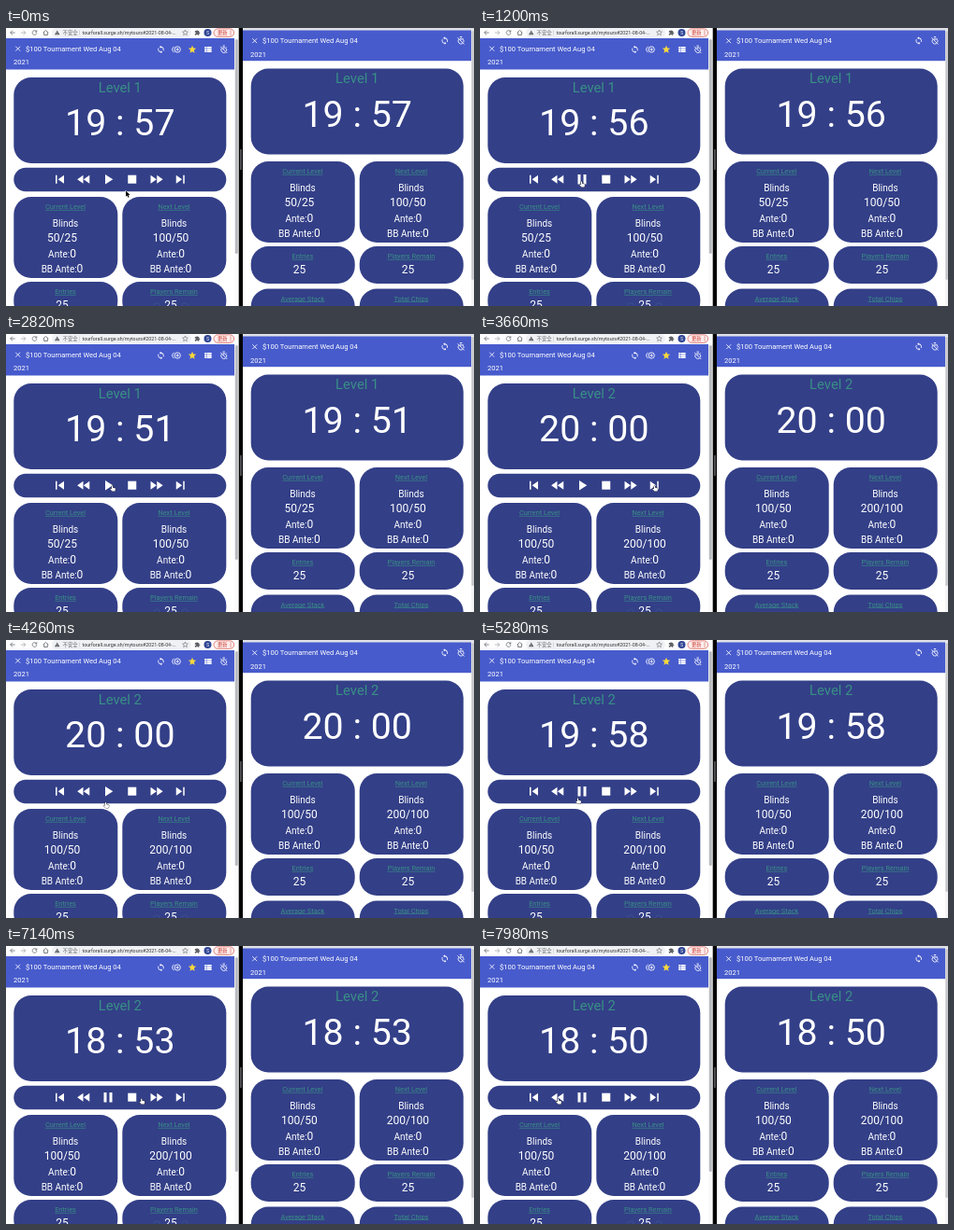
Animation, 500 px wide and 298 px high, one loop 8000 ms. Source, as an HTML page with a canvas:

```html
<!DOCTYPE html>
<html lang="zh-CN">
<head>
<meta charset="utf-8">
<title>Tournament clock</title>
<style>
html, body { margin: 0; width: 100%; height: 100%; overflow: hidden; background: #fff; }
canvas { display: block; width: 500px; height: 298px; }
</style>
</head>
<body>
<canvas id="stage"></canvas>
<script>
const W = 500, H = 298, LOOP = 8000, TICK = 330;
const BAR = '#475bcc', CARD = '#333f87', TEAL = '#398f86', WHITE = '#fff';
const RADIUS = 18.5, COLUMN = 116;
const SANS = 'Roboto, sans-serif', CJK = '"Noto Sans CJK SC", "Noto Sans CJK", sans-serif';

const canvas = document.getElementById('stage');
const ctx = canvas.getContext('2d');
const ratio = Math.max(1, window.devicePixelRatio || 1);
canvas.width = W * ratio;
canvas.height = H * ratio;

// Icons on a 24-unit grid
const ICONS = {
  prev: 'M6 6h2v12H6zm3.5 6l8.5 6V6z',
  rewind: 'M11 18V6l-8.5 6 8.5 6zm.5-6l8.5 6V6l-8.5 6z',
  play: 'M8 5v14l11-7z',
  pause: 'M6 19h4V5H6v14zm8-14v14h4V5h-4z',
  stop: 'M6 6h12v12H6z',
  forward: 'M4 18l8.5-6L4 6v12zm9-12v12l8.5-6L13 6z',
  next: 'M6 18l8.5-6L6 6v12zM16 6v12h2V6h-2z',
  star: 'M12 17.3L18.2 21l-1.6-7L22 9.2l-7.2-.6L12 2 9.2 8.6 2 9.2 7.5 14 5.8 21z',
  sync: 'M12 4V1L8 5l4 4V6c3.3 0 6 2.7 6 6 0 1-.25 2-.7 2.8l1.46 1.46C19.5 15 20 13.6 20 12c0-4.4-3.6-8-8-8zm0 14c-3.3 0-6-2.7-6-6 0-1 .25-2 .7-2.8L5.24 7.74C4.5 9 4 10.4 4 12c0 4.4 3.6 8 8 8v3l4-4-4-4v3z',
  list: 'M4 5h4v4H4zm0 5h4v4H4zm0 5h4v4H4zM9 5h12v4H9zm0 5h12v4H9zm0 5h12v4H9z',
  warn: 'M1 21h22L12 2zm12-3h-2v-2h2zm0-4h-2v-4h2z',
  puzzle: 'M20 11h-1V7c0-1-1-2-2-2h-4V4a2.5 2.5 0 0 0-5 0v1H4c-1 0-2 1-2 2v4h1.5a2.5 2.5 0 0 1 0 5H2v4c0 1 1 2 2 2h4v-1.5a2.5 2.5 0 0 1 5 0V22h4c1 0 2-1 2-2v-4h1a2.5 2.5 0 0 0 0-5z'
};
const LINES = {
  close: 'M5.5 5.5l13 13m0-13l-13 13',
  timer: 'M9 2h6M3 4l18 18M9 6.6a8 8 0 0 1 10.2 10.2M16.5 20A8 8 0 0 1 5.7 9M12 8v3M18 7l1.5-1.5',
  duplicate: 'M15 4a8 8 0 0 1 0 16a8 8 0 0 1 0-16M6 4.6a8 8 0 0 0 0 14.800M15 8v8m-4-4h8',
  back: 'M21 12H4m8-8l-8 8 8 8',
  ahead: 'M3 12h17m-8-8l8 8-8 8',
  reload: 'M19 8a8 8 0 1 0 1 5M20 3v6h-6',
  home: 'M3 12l9-8 9 8M6 10v10h12V10',
  star: ICONS.star
};
const toPaths = set => Object.fromEntries(Object.entries(set).map(([k, d]) => [k, new Path2D(d)]));
const fills = toPaths(ICONS), strokes = toPaths(LINES);
const handShape = new Path2D('M2 1.2Q2 0 2.7 0T3.4 1.2V2.6L6 3.100Q7 3.400 6.800 4.500L6.200 7H2.700L.3 4.600Q0 3.700 1 3.800L2 4.400Z');
const arrowShape = new Path2D('M0 0V6.3L1.5 5 2.5 7.2 3.6 6.7 2.6 4.6H4.5Z');

function onGrid(x, y, size, draw) {
  ctx.save();
  ctx.translate(x - size / 2, y - size / 2);
  ctx.scale(size / 24, size / 24);
  draw();
  ctx.restore();
}
function icon(name, x, y, size, color = WHITE) {
  onGrid(x, y, size, () => { ctx.fillStyle = color; ctx.fill(fills[name], 'evenodd'); });
}
function lineIcon(name, x, y, size, color = WHITE, width = 2.2) {
  onGrid(x, y, size, () => {
    ctx.strokeStyle = color;
    ctx.lineWidth = width;
    ctx.stroke(strokes[name]);
  });
}
function rect(x, y, w, h, color) {
  ctx.fillStyle = color;
  ctx.fillRect(x, y, w, h);
}
function round(x, y, w, h, r, color = CARD) {
  ctx.fillStyle = color;
  ctx.beginPath();
  ctx.roundRect(x, y, w, h, r);
  ctx.fill();
}
function circle(x, y, r, color) {
  ctx.fillStyle = color;
  ctx.beginPath();
  ctx.arc(x, y, r, 0, 7);
  ctx.fill();
}
function text(str, x, y, size, { color = WHITE, align = 'center', font = SANS } = {}) {
  ctx.font = `${size}px ${font}`;
  ctx.textAlign = align;
  ctx.fillStyle = color;
  ctx.fillText(str, x, y);
}
function heading(str, x, y) {
  text(str, x, y, 7.4, { color: TEAL });
  const w = ctx.measureText(str).width;
  rect(x - w / 2, y + 0.9, w, 0.6, TEAL);
}
function labelled(label, value, x, y) {
  ctx.font = `10px ${SANS}`;
  const a = ctx.measureText(label).width;
  ctx.font = `12px ${SANS}`;
  const left = x - (a + ctx.measureText(value).width) / 2;
  text(label, left, y, 10, { align: 'left' });
  text(value, left + a, y, 12, { align: 'left' });
}

function blindsCard(x, y, title, blinds) {
  round(x, y, 111, 87, RADIUS);
  const mid = x + 55.2;
  heading(title, mid, y + 13);
  text('Blinds', mid, y + 31.7, 10);
  text(blinds, mid - 3.5, y + 48, 12);
  labelled('Ante:', '0', mid - 3.5, y + 64.5);
  labelled('BB Ante:', '0', mid - 3.5, y + 81);
}
function countCard(x, y, title, value) {
  round(x, y, 111, 40, RADIUS);
  heading(title, x + 55.2, y + 13);
  text(value, x + 51.7, y + 29.3, 12);
}
function clockCard(x, y, game) {
  round(x, y, 227, 92, RADIUS);
  text('Level ' + game.level, x + 113.5, y + 15.6, 14.8, { color: TEAL });
  const two = n => String(n).padStart(2, '0');
  text(`${two(Math.floor(game.left / 60))} : ${two(game.left % 60)}`, x + 113.5, y + 62.3, 39.3);
}
function tables(x, y, game) {
  const [now, then] = game.level === 1 ? ['50/25', '100/50'] : ['100/50', '200/100'];
  blindsCard(x, y, 'Current Level', now);
  blindsCard(x + COLUMN, y, 'Next Level', then);
  countCard(x, y + 91, 'Entries', '25');
  countCard(x + COLUMN, y + 91, 'Players Remain', '25');
}
function appBar(x, y, w, h) {
  rect(x, y, w, h, BAR);
  lineIcon('close', x + 12.7, y + 11.2, 9);
  text('$100 Tournament Wed Aug 04', x + 21, y + 13.6, 7.55, { align: 'left' });
  text('2021', x + 8, y + 28.2, 7.55, { align: 'left' });
}

function browserBar() {
  const ink = '#5f6368';
  rect(0, 0, 248, 11, '#fdfdfe');
  round(49, 0, 149, 10, 5, '#f0f1f4');
  lineIcon('back', 7, 5, 7, ink, 2.6);
  lineIcon('ahead', 18.5, 5, 7, '#a5a8ac', 2.6);
  lineIcon('reload', 30.5, 5, 7, ink, 2.6);
  lineIcon('home', 42.5, 5, 7.5, ink, 2.6);
  icon('warn', 54.7, 5, 6, ink);
  text('不安全', 60.5, 7, 5.4, { color: ink, align: 'left', font: CJK });
  rect(78.5, 2.5, 0.5, 5, '#bbb');
  text('tourforall.surge.sh/mytours#2021-08-04-...', 81.5, 7, 5.3, { color: '#333', align: 'left' });
  lineIcon('star', 191.5, 5, 7, ink, 2);
  icon('puzzle', 204.5, 5, 6.5, ink);
  circle(215.5, 5, 4, '#2f4595');
  text('S', 215.5, 6.7, 4.6);
  round(222, 0.8, 21.6, 8.6, 4.3, '#fdeeed');
  ctx.strokeStyle = '#d9564c';
  ctx.lineWidth = 0.7;
  ctx.stroke();
  text('更新', 226, 7, 5.3, { color: '#c9382e', align: 'left', font: CJK });
  for (const y of [3, 5, 7]) circle(240, y, 0.55, '#c9382e');
}

function leftWindow(game) {
  rect(0, 0, 249, H, WHITE);
  browserBar();
  appBar(0, 11, 244, 33.5);
  icon('sync', 165.5, 23, 9.5);
  lineIcon('duplicate', 182, 23, 9.5);
  icon('star', 199, 23, 10, '#fcd93a');
  icon('list', 215.7, 23, 10.5);
  lineIcon('timer', 232.7, 23, 9.5);
  rect(244, 11, 5, H - 11, '#fafafa');
  round(244.8, 12, 3, 230, 1.5, '#b9bbc0');

  clockCard(8.3, 53, game);
  round(8.3, 149.7, 227, 25.5, 12.75);
  const buttons = ['prev', 'rewind', game.running ? 'pause' : 'play', 'stop', 'forward', 'next'];
  buttons.forEach((name, i) => icon(name, 57.5 + i * 25.75, 162.2, 18));
  tables(8.3, 181, game);
  for (const x of [161, 191]) {
    ctx.strokeStyle = '#3a5689';
    ctx.lineWidth = 0.8;
    ctx.beginPath();
    ctx.arc(x, 298, 3.2, 0, 7);
    ctx.stroke();
  }
}

function rightWindow(game) {
  rect(253, 0, 247, H, WHITE);
  rect(253, 0, 247, 3, '#dfe1e8');
  appBar(253, 2.5, 244, 32.7);
  lineIcon('timer', 486, 13.5, 9.5);
  icon('sync', 468.7, 13.5, 9.5);
  rect(497, 2.5, 3, H, '#f4f4f6');
  round(497.4, 3, 2.4, 267, 1.2, '#c4c5ca');
  clockCard(261.7, 43.5, game);
  tables(261.7, 143, game);
  countCard(261.7, 279.5, 'Average Stack', '');
  countCard(261.7 + COLUMN, 279.5, 'Total Chips', '');
}

// Pointer stops: time, x, y
const STOPS = [
  [0, 128, 174.5], [250, 128, 174.5], [750, 108, 163.5], [2300, 108, 163.5],
  [2700, 113, 161.5], [2880, 113, 161.5], [3400, 186, 161.5], [3720, 186, 161.5],
  [4200, 106, 173], [4300, 106, 173], [4500, 108, 164], [4700, 108, 164],
  [5150, 104, 168.5], [5550, 104, 168.5], [6250, 164, 162.5], [6900, 164, 162.5],
  [7650, 83, 162.5], [LOOP, 83, 162.5]
];
function pointer(t) {
  const i = STOPS.findIndex(s => s[0] > t);
  const [t0, x0, y0] = STOPS[i - 1], [t1, x1, y1] = STOPS[i];
  const p = (t - t0) / (t1 - t0), e = p * p * (3 - 2 * p);
  const x = x0 + (x1 - x0) * e, y = y0 + (y1 - y0) * e;
  const arrow = t < 450;
  ctx.save();
  ctx.lineJoin = 'round';
  if (arrow) {
    ctx.translate(x, y);
  } else {
    ctx.translate(x - 1.8, y + 1);
    ctx.scale(0.85, 0.85);
  }
  ctx.lineWidth = 1;
  ctx.strokeStyle = arrow ? WHITE : '#222';
  ctx.fillStyle = arrow ? '#000' : WHITE;
  const shape = arrow ? arrowShape : handShape;
  ctx.stroke(shape);
  ctx.fill(shape);
  ctx.restore();
}

function gameAt(t) {
  const ticks = start => Math.max(0, Math.floor((t - start) / TICK));
  if (t < 3600) {
    return { level: 1, left: 1197 - Math.min(6, ticks(810)), running: t >= 810 && t < 2795 };
  }
  const skipped = t >= 6580 ? 60 : 0;
  return { level: 2, left: 1200 - ticks(4560) - skipped, running: t >= 4560 };
}

function draw(t) {
  ctx.setTransform(ratio, 0, 0, ratio, 0, 0);
  const game = gameAt(t);
  leftWindow(game);
  rightWindow(game);
  rect(248.7, 0, 4.3, H, '#050506');
  round(250.3, 130, 1.3, 22, 0.6, '#77787c');
  pointer(t);
}

const start = performance.now();
function loop() {
  draw((performance.now() - start) % LOOP);
  requestAnimationFrame(loop);
}
loop();
</script>
</body>
</html>
```
